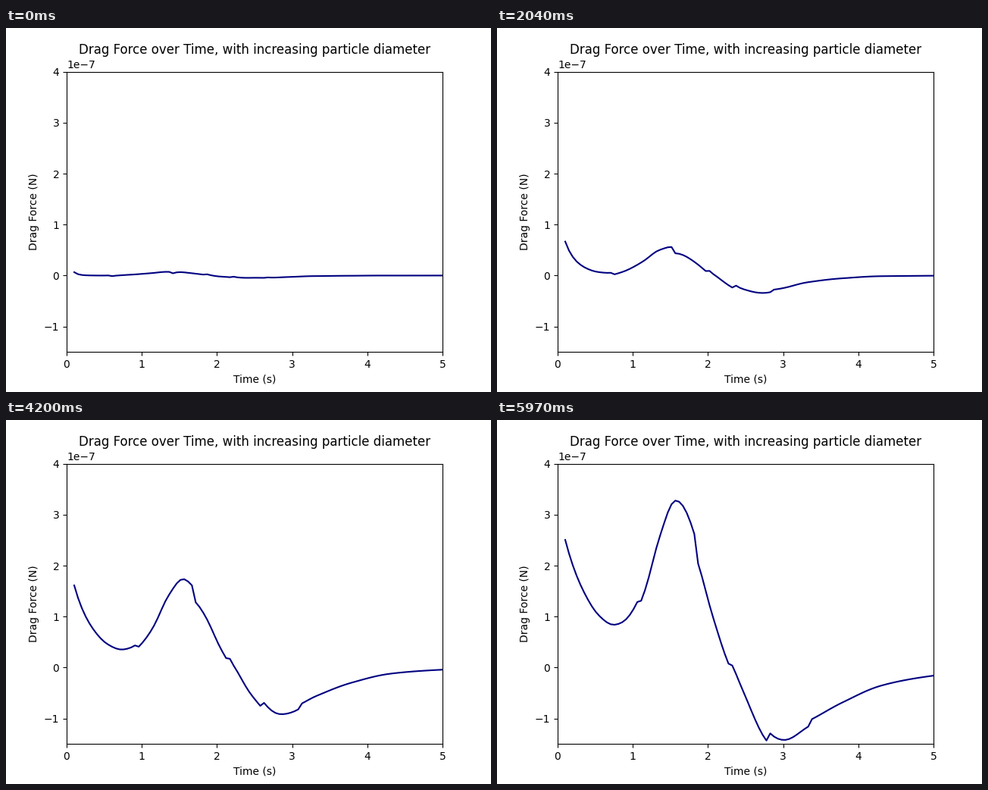
These frames come from a looping animation (640 by 480 pixels, 6000 ms). A matplotlib script:

```python
import numpy as np
import matplotlib.pyplot as plt
from matplotlib.animation import FuncAnimation

FRAMES, SAMPLES, SUBSTEPS = 200, 100, 20
DT = 5 / (SAMPLES - 1)
RELAX = 0.991        # relaxation time of the largest particle, s
REYNOLDS = 12.3      # of the largest particle at inlet speed
DRAG = 1.727e-7      # Stokes drag of the largest particle at inlet speed, N

# Gas speed above the inlet speed, in percent, at a few times.
GUST_T = np.array([0, .35, .55, .76, .96, 1.16, 1.36, 1.57, 1.72, 1.87,
                   2.07, 2.47, 2.83, 3.03, 3.33, 3.8, 4.3, 5])
GUST = np.array([0, 0, 0, 5, 22, 56, 109, 163, 185, 192,
                 178, 115, 58, 38, 23, 12, 9.5, 8])

# Speed steps met on the way: sample for the smallest particle,
# delay of the largest, growth of the delay, height in percent.
STEPS = [(11.5, 10.2, 1.15, -4.5), (27.5, 9.1, 1, -9), (36.05, 9.78, 1, 7),
         (43.1, 12.2, 1.15, 7), (52.1, 14.1, 1.15, 3.5)]


def hermite(x, xs, ys):
    m = np.gradient(ys, xs, edge_order=2)
    i = np.clip(np.searchsorted(xs, x) - 1, 0, len(xs) - 2)
    h = xs[i + 1] - xs[i]
    u = (x - xs[i]) / h
    return ((1 + 2 * u) * (1 - u) ** 2 * ys[i] + u * (1 - u) ** 2 * h * m[i]
            + u * u * (3 - 2 * u) * ys[i + 1] + u * u * (u - 1) * h * m[i + 1])


def simulate():
    """Drag force of every particle size (rows) at every sample (columns)."""
    s = np.linspace(0, 1, FRAMES)
    d = 0.25 + 0.75 * s
    ticks = np.arange(SAMPLES * SUBSTEPS) / SUBSTEPS
    gust = hermite(ticks * DT, GUST_T, GUST)
    v = np.zeros(FRAMES)
    force = np.empty((FRAMES, SAMPLES))
    for j, tick in enumerate(ticks):
        speed = 100 + gust[j]
        for first, delay, power, height in STEPS:
            speed = speed + height * (tick > first + delay * s ** power)
        slip = speed / 100 - v
        # Schiller-Naumann drag
        pull = slip * (1 + 0.15 * (REYNOLDS * d * np.abs(slip)) ** 0.687)
        if j % SUBSTEPS == 0:
            force[:, j // SUBSTEPS] = DRAG * d * pull
        v = v + pull / (RELAX * d ** 2) * DT / SUBSTEPS
    return force


force = simulate()[:, 2:]
t = np.linspace(0, 5, SAMPLES)[2:]

fig, ax = plt.subplots(figsize=(6.4, 4.8), dpi=100)
line, = ax.plot(t, force[0], color="navy", lw=1.5)
ax.set(xlim=(0, 5), ylim=(-1.5e-7, 4e-7), xlabel="Time (s)",
       ylabel="Drag Force (N)",
       title="Drag Force over Time, with increasing particle diameter")


def update(n):
    line.set_ydata(force[n])
    return line,


anim = FuncAnimation(fig, update, frames=FRAMES, interval=30,
                     repeat=True, repeat_delay=0)
plt.show()
```
